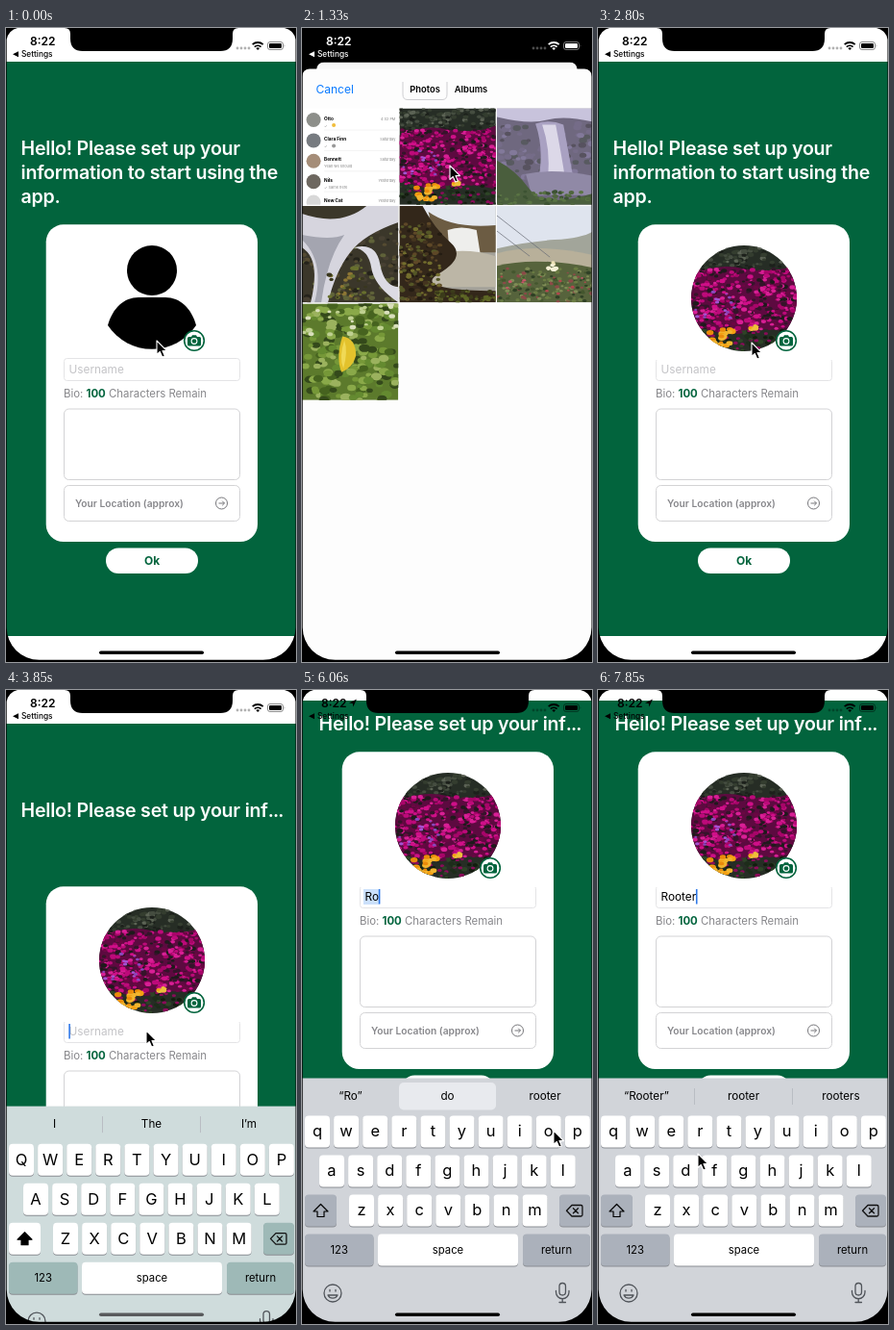
Write an HTML page that moves like this. It is 302 by 659 pixels and loops after 8 s.

```html
<!DOCTYPE html>
<html lang="en">
<head>
<meta charset="utf-8">
<title>Profile setup</title>
<style>
  html, body { margin: 0; width: 100%; height: 100%; overflow: hidden; background: #000; }
  svg { display: block; font-family: Inter, "Open Sans", sans-serif; }
  #stage { width: 302px; height: 659px; }
  .mid { text-anchor: middle; }
  .title { font-size: 19.6px; font-weight: 600; letter-spacing: -.22px; fill: #fff; }
  .box { fill: #fff; stroke: #d3d3d5; }
  .line { fill: none; stroke: #50545a; stroke-width: 1.3; stroke-linecap: round; stroke-linejoin: round; }
  .letter { font-size: 16.5px; text-anchor: middle; }
  .word { font-size: 11.7px; text-anchor: middle; }
</style>
</head>
<body>
<svg id="stage" viewBox="0 0 302 659">
  <defs>
    <clipPath id="round"><circle cx="152" cy="281" r="55"/></clipPath>
    <clipPath id="page"><rect id="pageRect" width="302" height="659"/></clipPath>
    <g id="pics"></g>
  </defs>
  <rect width="302" height="659"/>

  <g id="form"><g clip-path="url(#page)">
    <rect width="302" height="659" fill="#fff"/>
    <rect id="green" width="302" fill="#02643d"/>
    <g id="titleFull" class="title">
      <text x="15.5" y="131.5">Hello! Please set up your</text>
      <text x="15.5" y="156.5">information to start using the</text>
      <text x="15.5" y="181.5">app.</text>
    </g>
    <text id="titleCut" class="title">Hello! Please set up your inf<tspan letter-spacing="-1">...</tspan></text>
    <g id="body">
      <rect x="41.700" y="204.300" width="220.300" height="329.700" rx="18" fill="#fff"/>
      <g id="person">
        <circle cx="152" cy="252" r="26"/>
        <path d="M106 309C111 291 123 280 138 280H166C181 280 193 291 198 309A55 55 0 0 1 106 309Z"/>
      </g>
      <rect class="box" x="60.500" y="343.500" width="183" height="23" rx="3" style="stroke:#e4e4e6"/>
      <g id="avatar">
        <rect x="58" y="340" width="188" height="5" fill="#fff"/>
        <g clip-path="url(#round)"><use href="#pic1" x="97" y="226" width="110" height="110"/></g>
      </g>
      <circle cx="196" cy="325" r="10.300" fill="#fff" stroke="#02643d" stroke-width="1.600"/>
      <path d="M190.500 321H193L194 319.300H198L199 321H201.500Q203 321 203 322.500V329Q203 330.500 201.500 330.500H190.500Q189 330.500 189 329V322.500Q189 321 190.500 321Z" fill="#02643d"/>
      <circle cx="196" cy="325.500" r="2.900" fill="none" stroke="#fff" stroke-width="1.100"/>
      <rect id="sel" x="64" y="347" height="16" fill="#cbe0fb"/>
      <text id="hint" x="65.500" y="359.200" font-size="11.800" fill="#c4c4c7">Username</text>
      <text id="typed" x="65.500" y="359.200" font-size="11.800"></text>
      <rect id="caret" y="347" width="1.600" height="15.500" fill="#2f78e8"/>
      <text x="60" y="384" font-size="11.400" fill="#87878b">Bio: <tspan font-weight="700" fill="#02643d">100</tspan> Characters Remain</text>
      <rect class="box" x="60.500" y="396" width="183" height="73.500" rx="5"/>
      <rect class="box" x="60.500" y="475.500" width="183" height="37" rx="5"/>
      <text x="72" y="497.700" font-size="10.250" font-weight="600" fill="#87878b">Your Location (approx)</text>
      <g fill="none" stroke="#77777b"><circle cx="224.500" cy="494" r="6"/><path d="M221.500 494H227.500M225.200 491.700L227.500 494L225.200 496.300"/></g>
      <rect x="104" y="540.500" width="96" height="26.500" rx="13.200" fill="#fff"/>
      <text class="mid" x="152" y="558" font-size="12" font-weight="700" fill="#02643d">Ok</text>
    </g>
    <rect id="dim" width="302" height="659"/>
  </g></g>

  <g id="picker">
    <rect y="42.500" width="302" height="640" rx="8" fill="#fdfdfd"/>
    <text x="14.500" y="67.700" font-size="12" fill="#0a7aff">Cancel</text>
    <path d="M105 56V69Q105 74.500 110 74.500H146Q151 74.500 151 69V56" fill="none" stroke="#cfcfd2"/>
    <g class="mid" font-size="9.400" font-weight="600"><text x="128" y="66.700">Photos</text><text x="176" y="66.700">Albums</text></g>
    <g id="grid"></g>
  </g>

  <g id="keyboard">
    <rect id="tray" y="403.500" width="302" height="256"/>
    <rect id="pick" x="101" y="408" width="101" height="28.500" rx="5" fill="#e8eaee"/>
    <path id="bars" d="M100.500 414V431M202.500 414V431" stroke="#b9bdc3"/>
    <g id="keys"></g>
    <g class="line">
      <circle cx="32" cy="627" r="9"/><path d="M27 629A5.500 5.500 0 0 0 37 629Z"/>
      <path d="M29 623.500V625M35 623.500V625"/>
      <rect x="268" y="616.500" width="6.500" height="12.500" rx="3.200"/>
      <path d="M264.500 624.500V626A6.700 6.700 0 0 0 278 626V624.500M271.200 633V636.500M268 636.500H274.500"/>
    </g>
  </g>

  <path d="M61 0Q67 0 67 6V11Q67 24 80 24H223Q236 24 236 11V6Q236 0 242 0Z"/>
  <g id="status">
    <g id="clock"><text x="25" y="17.500" font-size="12" font-weight="600">8:22</text>
      <path id="arrow" d="M54 13.500L62 9.500L58.300 17.500L57.800 13.900Z"/></g>
    <path d="M7 27.200L13 24.200V30.200Z"/>
    <text x="16" y="30" font-size="8.300" font-weight="500">Settings</text>
    <g opacity=".3"><circle cx="241" cy="21" r="1.400"/><circle cx="245" cy="21" r="1.400"/><circle cx="249" cy="21" r="1.400"/><circle cx="253" cy="21" r="1.400"/></g>
    <g fill="none" stroke="currentColor" stroke-width="1.800"><path d="M256.700 17.200A8 8 0 0 1 267.700 17.200M258.800 19.700A5 5 0 0 1 265.600 19.700"/></g>
    <path d="M262.200 23L260.300 21Q262.200 19.700 264.100 21Z"/>
    <rect x="272.500" y="14.500" width="16" height="8" rx="2.400" fill="none" stroke="currentColor" stroke-opacity=".45"/>
    <rect x="274" y="16" width="13" height="5" rx="1.200"/><path d="M289.700 17V20Q291 18.500 289.700 17Z" opacity=".5"/>
  </g>
  <rect id="home" x="97" y="647.500" width="109" height="3.600" rx="1.800"/>
  <path fill-rule="evenodd" d="M0 0H302V659H0ZM.7 12V623A33.800 33.800 0 0 0 34.500 656.800H267.700A33.800 33.800 0 0 0 301.500 623V12A14 14 0 0 0 290 0H12A14 14 0 0 0 .7 12Z"/>
  <path id="mouse" d="M0 0V14.500L3.300 11.500L5.700 17L8.300 15.900L6 10.600H10.500Z" stroke="#fff" stroke-width="1.100" stroke-linejoin="round"/>
</svg>

<script>
const $ = id => document.getElementById(id);
const show = (id, on) => $(id).style.display = on ? '' : 'none';
const set = (id, attrs) => { for (const k in attrs) $(id).setAttribute(k, attrs[k]); };

let seed = 11;
const rnd = () => (seed = seed * 16807 % 2147483647) / 2147483647;
const rect = (y, h, fill) => `<rect y="${y}" width="100" height="${h}" fill="${fill}"/>`;
const path = (fill, d) => `<path fill="${fill}" d="${d}"/>`;

// Scatter n soft blobs over a box
const dots = (n, colors, x, y, w, h, r) => Array.from({ length: n }, () => {
  const size = r * (.6 + .7 * rnd()), c = colors[rnd() * colors.length | 0];
  return `<ellipse cx="${(x + w * rnd()).toFixed(1)}" cy="${(y + h * rnd()).toFixed(1)}" rx="${size.toFixed(1)}" ry="${(size * .7).toFixed(1)}" fill="${c}"/>`;
}).join('');

const chats = [['Otto', '4:02 PM'], ['Clara Finn', 'Saturday'], ['Bennett', 'Saturday'], ['Nils', 'Yesterday'], ['New Cat', 'Yesterday']];
const notes = ['✓', '✓', 'Yeah we should', '✓ Same here', ''];
const chatList = rect(0, 100, '#fff') + chats.map(([name, when], i) => {
  const y = 12 + i * 21.3;
  return `<circle cx="12" cy="${y}" r="7.500" fill="${['#8d8f8a', '#777b80', '#a58d78', '#6d675f', '#d8d8d8'][i]}"/>
    <text x="23" y="${y}" font-size="4.700" font-weight="700">${name}</text>
    <text x="23" y="${y + 7}" font-size="3.900" fill="#888">${notes[i]}</text>
    <text x="97" y="${y}" font-size="3.800" fill="#888" text-anchor="end">${when}</text>
    ${i < 2 ? `<circle cx="33" cy="${y + 5.5}" r="2" fill="${i ? '#999' : '#f1bd3a'}"/>` : ''}
    <path d="M23 ${y + 10.5}H100" stroke="#e6e6e6" stroke-width=".5"/>`;
}).join('');

const pics = [
  chatList,
  rect(0, 100, '#262d25') + dots(130, ['#1c201b', '#454d40', '#5c6355', '#343d2f'], 0, 0, 100, 24, 2.2) +
    path('#5d0a40', 'M0 28Q25 16 50 22T100 18V84Q70 76 52 82T0 74Z') +
    dots(430, ['#cf0f88', '#bd0a7a', '#d81f95', '#a80569', '#6a0742', '#35142a', '#1f1a1c'], 0, 22, 100, 58, 2.3) +
    dots(16, ['#a552d2', '#8a48bd'], 0, 44, 42, 26, 1.7) +
    dots(110, ['#1d2c1a', '#2d4426', '#131d0f', '#8c0a5a'], 0, 80, 100, 20, 2.2) +
    dots(22, ['#f5a012', '#f2b52e', '#ea8a0a'], 17, 79, 22, 16, 3) +
    dots(5, ['#f5a012', '#eec03a'], 53, 72, 10, 12, 2.5),
  rect(0, 100, '#6f687f') + path('#c8c3dc', 'M0 0H100V14Q70 7 52 12T0 9Z') +
    dots(90, ['#756c88', '#585a60', '#82799a', '#57525f'], 0, 16, 100, 56, 3.5) +
    path('#a9a1c2', 'M40 16Q55 11 69 17L80 76Q60 86 42 78Q50 45 40 16Z') +
    path('#dcd8e8', 'M47 17H61Q67 48 71 74L52 78Q57 46 47 17Z') +
    path('#9089a6', 'M30 68Q58 62 100 70V90H36Z') +
    path('#4a5e3d', 'M0 54Q20 64 34 84T100 88V100H0Z') +
    dots(60, ['#5a7444', '#3c5232', '#50663e'], 0, 86, 100, 14, 2.2),
  rect(0, 100, '#3b372a') + dots(150, ['#25231b', '#554b31', '#5f6239', '#474032'], 0, 15, 100, 85, 2.8) +
    path('#d6d5de', 'M0 8Q40 22 67 0H100V17Q65 29 50 48T27 100H9Q20 55 0 43Z') +
    path('#a4a5b0', 'M0 30Q30 36 44 30Q26 55 20 100H13Q24 58 0 35Z') +
    path('#dcdbe3', 'M54 43Q77 37 81 60T100 84V100Q75 83 72 64T54 43Z') +
    dots(40, ['#68702e', '#8d7634', '#39371e'], 28, 62, 38, 36, 2.4),
  rect(0, 100, '#a3a199') + path('#e4e8ef', 'M20 0H100V30H50Z') +
    path('#6c5c43', 'M30 6Q55 24 100 20V48H40Z') +
    path('#eeeeec', 'M50 25Q64 20 80 25L84 50H52Z') +
    path('#bcb6a6', 'M44 49Q70 43 100 52V84H30Z') +
    path('#33271a', 'M0 0H24Q36 23 53 38T41 70T100 88V100H0Z') +
    dots(170, ['#44351f', '#555727', '#736e2d', '#241c12', '#5e4827'], 0, 18, 43, 80, 2.4) +
    dots(60, ['#5d6625', '#3b3b1a'], 35, 88, 65, 12, 2.2),
  rect(0, 100, '#dfe4ee') + path('#a2a59a', 'M0 44Q30 37 60 35T100 26V60H0Z') +
    path('#b8b09a', 'M0 49Q44 38 100 51V70H0Z') +
    path('#56633c', 'M0 62Q40 52 100 64V100H0Z') +
    dots(180, ['#44562e', '#6a7c43', '#7f8c56', '#2f4025', '#8c4a48'], 0, 64, 100, 35, 2) +
    '<path d="M0 10L55 53M0 26L34 52" stroke="#666b75" stroke-width=".7"/>' +
    dots(8, ['#eee3b7', '#f5f0d6'], 53, 58, 11, 8, 2.6) + dots(14, ['#c8566a', '#b2464d'], 4, 72, 90, 20, 1.6),
  rect(0, 100, '#5c7a2c') + dots(210, ['#46631f', '#769838', '#8aa949', '#34491b', '#9bb25e', '#648a30'], 0, 0, 100, 100, 4.5) +
    dots(25, ['#d9dfbc', '#bfd091'], 0, 0, 100, 32, 2.8) +
    path('#e3c22c', 'M42 34Q56 36 56 54Q53 66 41 71Q35 56 42 34Z') + path('#f0d956', 'M44 38Q48 50 43 67Q38 56 44 38Z')
];
$('pics').innerHTML = pics.map((p, i) => `<symbol id="pic${i}" viewBox="0 0 100 100">${p}</symbol>`).join('');
$('grid').innerHTML = pics.map((p, i) =>
  `<use href="#pic${i}" x="${i % 3 * 101.5}" y="${83.5 + (i / 3 | 0) * 101.5}" width="100.300" height="100.300"/>`).join('');

const key = (x, y, w, cls = '') =>
  `<rect x="${x}" y="${y + 1}" width="${w}" height="33" rx="4" fill="#8a8d93"/>
   <rect class="${cls}" x="${x}" y="${y}" width="${w}" height="33" rx="4" fill="#fff"/>`;
const rows = [['qwertyuiop', 16], ['asdfghjkl', 31], ['zxcvbnm', 62]];
$('keys').innerHTML = rows.map(([chars, x0], r) => [...chars].map((c, i) => {
  const x = x0 + 30.1 * i, y = 442.5 + 41 * r;
  return key(x - 13, y, 26) + `<text class="letter" x="${x}" y="${y + 22.3}">${c}</text>`;
}).join('')).join('') +
  key(3, 524.5, 33, 'shift') + key(268, 524.5, 32, 'fn') + key(3, 565.5, 71.5, 'fn') + key(79, 565.5, 146) + key(230, 565.5, 70, 'fn') +
  '<path id="shiftIcon" d="M19.500 534.500L27 542H23V547.500H16V542H12Z" stroke="#000" stroke-width="1.200" stroke-linejoin="round"/>' +
  '<path class="line" style="stroke:#111" d="M281 535.500H290.500Q292 535.500 292 537V545.500Q292 547 290.500 547H281L275.500 541.200ZM282.500 538.700L287.500 543.800M287.500 538.700L282.500 543.800"/>' +
  [['123', 38.7], ['space', 152], ['return', 265]].map(([s, x]) => `<text class="mid" x="${x}" y="585.500" font-size="11.300">${s}</text>`).join('') +
  [50.5, 151.5, 253].map(x => `<text class="word" x="${x}" y="426"></text>`).join('');
const letters = [...document.querySelectorAll('.letter')], words = [...document.querySelectorAll('.word')];
const fnKeys = [...document.querySelectorAll('.fn')], shift = document.querySelector('.shift');

// Time, field text, suggestions
const typing = [
  [3700, '', ['I', 'The', 'I’m']],
  [5000, 'R', ['“R”', 'Right', 'Really']],
  [5700, 'Ro', ['“Ro”', 'do', 'rooter']],
  [6250, 'Roo', ['“Roo”', 'room', 'rooter']],
  [6500, 'Root', ['“Root”', 'root', 'rooter']],
  [6750, 'Roote', ['“Roote”', 'rooter', 'rooted']],
  [7000, 'Rooter', ['“Rooter”', 'rooter', 'rooters']]
];
// Time, x, y of the pointer tip
const track = [
  [0, 157, 325], [300, 157, 325], [1180, 154, 146], [1330, 154, 143], [2100, 154, 143], [2780, 160, 327], [2900, 160, 327],
  [3200, 146, 382], [3400, 146, 354], [3860, 146, 354], [4420, 226, 404], [4540, 226, 404], [4950, 122, 498], [5080, 122, 498],
  [5600, 270, 496], [5750, 270, 496], [6000, 262, 458], [6200, 262, 458], [6450, 50, 462], [6520, 50, 462],
  [6700, 78, 460], [6950, 106, 462], [7100, 106, 462], [7350, 104, 482], [8000, 104, 482]
];

const ramp = (t, a, b) => Math.min(1, Math.max(0, (t - a) / (b - a)));
const out = p => 1 - (1 - p) ** 3;
const smooth = p => p * p * (3 - 2 * p);
const mix = (a, b, p) => a + (b - a) * p;
const blend = (a, b, p) => `rgb(${a.map((v, i) => mix(v, b[i], p))})`;

function draw(t) {
  const sheet = out(ramp(t, 200, 700)) * (1 - out(ramp(t, 2100, 2600)));
  const rise = out(ramp(t, 3650, 4040));
  const lift = smooth(ramp(t, 3860, 4250));

  set('form', { transform: `translate(${15 * sheet} ${35.5 * sheet}) scale(${1 - .1 * sheet})` });
  set('pageRect', { rx: 9 * sheet });
  set('dim', { opacity: .03 * sheet });
  set('picker', { transform: `translate(0 ${620 * (1 - sheet)})` });
  show('picker', sheet > 0);
  show('grid', t > 700);

  const top = mix(35, 11, lift);
  set('green', { y: top, height: 632 - 140 * lift - top });
  set('body', { transform: `translate(0 ${-140 * lift})` });
  show('titleFull', t < 3700);
  show('titleCut', t >= 3700);
  set('titleCut', { x: 15.5 + 2 * lift, y: 131.5 - 89.5 * lift });
  show('person', t < 2150);
  show('avatar', t >= 2150);

  const ink = sheet > .5 ? '#fff' : '#000', located = t > 4000;
  set('status', { fill: ink, color: ink });
  set('clock', { transform: `translate(${located ? -5 : 0} 0)` });
  show('arrow', located);
  set('home', { fill: t > 3700 && t < 4950 ? '#585a5c' : '#000' });

  const [since, text, tips] = typing.filter(s => s[0] <= t).pop() || typing[0];
  const caps = !text, chosen = text === 'Ro';
  show('keyboard', rise > 0);
  set('keyboard', { transform: `translate(0 ${256 * (1 - rise)})` });
  set('tray', { fill: blend([207, 220, 220], [209, 212, 217], lift) });
  const gray = blend([158, 185, 183], [171, 177, 187], lift);
  fnKeys.forEach(k => k.style.fill = gray);
  shift.style.fill = caps ? '#fff' : gray;
  set('shiftIcon', { fill: caps ? '#000' : 'none' });
  letters.forEach(l => {
    l.textContent = caps ? l.textContent.toUpperCase() : l.textContent.toLowerCase();
    l.setAttribute('dy', caps ? 0 : -1);
  });
  words.forEach((w, i) => w.textContent = tips[i]);
  show('pick', chosen);
  show('bars', !chosen);

  $('typed').textContent = text;
  const width = text ? $('typed').getComputedTextLength() : 0;
  show('hint', !text);
  show('sel', chosen);
  set('sel', { width: width + 2 });
  set('caret', { x: 65.3 + width });
  show('caret', t >= 3700 && (t - since) % 820 < 500);

  const i = Math.max(1, track.findIndex(p => p[0] > t));
  const [t0, x0, y0] = track[i - 1], [t1, x1, y1] = track[i];
  const p = smooth(ramp(t, t0, t1));
  set('mouse', { transform: `translate(${mix(x0, x1, p)} ${mix(y0, y1, p)})` });
}

function tick() {
  draw(performance.now() % 8000);
  requestAnimationFrame(tick);
}
tick();
</script>
</body>
</html>
```
